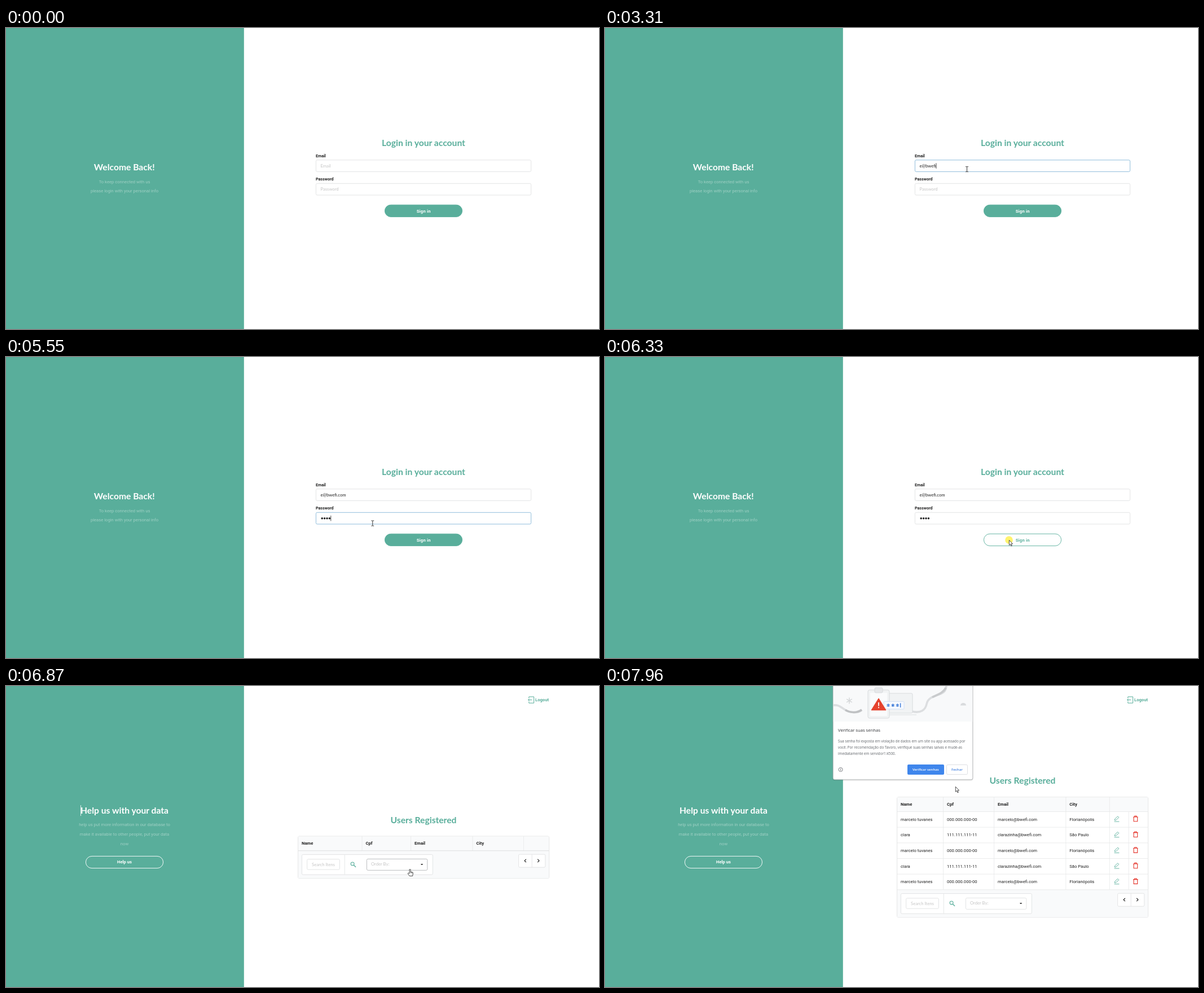
An HTML page that plays this animation: 1051 by 533 pixels, repeating every 8000 ms.

```html
<!DOCTYPE html>
<html lang="en">
<head>
<meta charset="utf-8">
<title>Login demo</title>
<style>
  html, body { margin: 0; width: 100%; height: 100%; overflow: hidden; background: #fff; }
  svg { display: block; width: 100vw; height: 100vh; }
  text { font-family: Roboto, sans-serif; font-size: 7.66px; fill: #212121; white-space: pre; }
  .title { font-family: Lato, sans-serif; font-size: 15.65px; font-weight: 700; fill: #59ae9b; }
  .field { font-family: Lato, sans-serif; }
  .hint { font-family: Lato, sans-serif; fill: #c5c5c5; }
  .label { font-size: 7.12px; font-weight: 700; }
  .bold { font-weight: 700; }
  .note { fill: #9fd0c4; }
  .white { fill: #fff; }
  .green { fill: #59ae9b; }
  .mid { text-anchor: middle; }
  .dialog text { font-family: "Open Sans", sans-serif; font-size: 6.27px; fill: #5f6368; }
  .dialog .head { font-size: 7.66px; fill: #303236; }
  .dialog .action { font-size: 6.1px; font-weight: 600; text-anchor: middle; }
</style>
</head>
<body>
<svg id="stage" viewBox="0 0 1051 533" xmlns="http://www.w3.org/2000/svg"></svg>
<script>
const LOOP = 8000, STEP = 75.5, BLINK = 530;
const GREEN = '#59ae9b', LINE = '#e0e1e2', BLUE = '#85b7d9';
const ADDRESS = 'e@bwefi.com';
const EMAIL_KEYS = [1280, 2150, 2530, 2610, 3010, 3160, 3310, 3770, 3850, 4000, 4170];
const PASS_KEYS = [5170, 5320, 5400, 5470];
const EMAIL_FOCUS = 745, PASS_FOCUS = 5020, HOVER = 5620, PRESS = 6250;
const HOME = 6490, LOADED = 6940, DIALOG = 7250;
const ROW = 27.65;

const text = (x, y, s, cls = '', extra = '') =>
  `<text x="${x}" y="${y}" class="${cls}" ${extra}>${s}</text>`;
const rect = (x, y, w, h, fill, extra = '') =>
  `<rect x="${x}" y="${y}" width="${w}" height="${h}" fill="${fill}" ${extra}/>`;
const path = (d, stroke, width = 1, extra = '') =>
  `<path d="${d}" fill="none" stroke="${stroke}" stroke-width="${width}" ${extra}/>`;
const box = (x, y, w, h, r, stroke = LINE, fill = '#fff', extra = '') =>
  rect(x, y, w, h, fill, `rx="${r}" stroke="${stroke}" stroke-width=".9" ${extra}`);
const group = (id, body, extra = '') => `<g id="${id}" ${extra}>${body}</g>`;

function loginPage() {
  return text(209.7, 252.2, 'Welcome Back!', 'title white mid')
    + text(210, 274.7, 'To keep connected with us', 'note mid')
    + text(210, 291.2, 'please login with your personal info', 'note mid')
    + text(740, 209.2, 'Login in your account', 'title mid')
    + text(549, 228.7, 'Email', 'label')
    + text(549, 270.2, 'Password', 'label')
    + box(549.4, 233.8, 381.2, 20.6, 2.2, LINE, '#fff', 'id="emailBox"')
    + box(549.4, 275.3, 381.2, 20.6, 2.2, LINE, '#fff', 'id="passBox"')
    + text(557.5, 246.8, 'Email', 'hint', 'id="emailHint"')
    + text(557.5, 288.3, 'Password', 'hint', 'id="passHint"')
    + text(557.5, 246.8, '', 'field', 'id="emailText"')
    + group('dots', PASS_KEYS.map((_, i) =>
        `<circle cx="${560.2 + i * 4.4}" cy="285.7" r="1.75" fill="#222"/>`).join(''))
    + rect(0, 0, .8, 9.6, '#222', 'id="caret"')
    + box(671.4, 313.2, 137.2, 21.2, 10.6, GREEN, GREEN, 'id="signBox"')
    + text(740.2, 326.5, 'Sign in', 'bold mid', 'id="signText" letter-spacing=".2"');
}

function sidePanel() {
  const lines = ['help us put more information in our database to',
    'make it available to other people, put your data', 'now'];
  return text(210, 226.3, 'Help us with your data', 'title white mid')
    + lines.map((s, i) => text(210, 248.3 + i * 16.6, s, 'note mid')).join('')
    + box(141.4, 301.4, 137.2, 21.2, 10.6, '#fff', 'none')
    + text(210, 314.3, 'Help us', 'bold white mid')
    + rect(132.2, 211, .8, 19, '#fff', 'id="sideCaret"');
}

function logout() {
  return path('M926.8 21.8V19H935.6V30.2H926.8V27.4M925.4 24.6H932.2M927.6 22.6L925.5 24.6L927.6 26.6', GREEN, 1)
    + text(938, 27, 'Logout', 'bold green');
}

const pencil = (x, y) =>
  path(`M${x - 4.2} ${y + 4.6}H${x + 4.6}M${x - 3.6} ${y + 2.4}L${x - 3} ${y - .2}L${x + 2} ${y - 4.8}L${x + 4} ${y - 2.8}L${x - 1} ${y + 1.8}Z`, GREEN, .9);
const bin = (x, y) =>
  path(`M${x - 4.3} ${y - 3.2}H${x + 4.3}M${x - 1.8} ${y - 3.2}V${y - 4.8}H${x + 1.8}V${y - 3.2}M${x - 3.3} ${y - 3}V${y + 4.6}H${x + 3.3}V${y - 3}`, '#e5352b', 1.1);

function footer(y, order) {
  return box(524.4, y + 6.8, 232, 35.6, 2)
    + path(`M600.3 ${y + 7}V${y + 42}`, LINE, .8)
    + box(533.6, y + 15, 57.8, 18.4, 2)
    + text(542, y + 27.1, 'Search Itens', 'hint')
    + `<circle cx="614.1" cy="${y + 23.2}" r="2.9" fill="none" stroke="${GREEN}" stroke-width="1.1"/>`
    + path(`M616.2 ${y + 25.3}L620 ${y + 29}`, GREEN, 1.3)
    + box(639.4, y + 14.6, 107.4, 20, 2.2, order)
    + text(647, y + 26.7, 'Order By:', 'hint')
    + `<path d="M734.9 ${y + 23.3}h4.4l-2.2 2.3z" fill="#222"/>`
    + box(908.6, y + 6.4, 47.2, 23, 2)
    + path(`M932.2 ${y + 6.4}v23`, LINE, .8)
    + path(`M921.8 ${y + 15}l-2.7 2.7l2.7 2.7M942.2 ${y + 15}l2.7 2.7l-2.7 2.7`, '#222', 1.2);
}

function table(top, cols, rows, order) {
  const head = top + 25.7, foot = head + rows.length * ROW, bottom = foot + 49;
  const left = [517.6, ...cols];
  let s = text(740, top - 23.5, 'Users Registered', 'title mid')
    + box(517.6, top, 445, bottom - top, 2.2)
    + rect(518, top + .4, 444.2, 25.3, '#f9fafb')
    + rect(518, foot, 444.2, 48.6, '#f9fafb')
    + ['Name', 'Cpf', 'Email', 'City'].map((h, i) => text(left[i] + 6.5, top + 15.3, h, 'bold')).join('');
  cols.forEach((x, i) => {
    const end = rows.length ? foot : head;
    s += path(`M${x} ${i > 3 ? head : top}V${end}`, '#e8e9ea', .8);
  });
  for (let i = 0; i <= rows.length; i++)
    s += path(`M518 ${head + i * ROW}H962.4`, rows.length ? '#e6e7e8' : '#d6d7d8', .8);
  rows.forEach((cells, r) => {
    const y = head + r * ROW + 13.5;
    s += cells.map((c, i) => text(left[i] + 6.5, y + 2.8, c)).join('') + pencil(906.8, y - .5) + bin(940.4, y - .8);
  });
  return s + footer(foot, order);
}

function star(x, y, r, color, width) {
  let d = '';
  for (let i = 0; i < 3; i++) {
    const a = Math.PI / 2 + i * Math.PI / 3, dx = r * Math.cos(a), dy = r * Math.sin(a);
    d += `M${x - dx} ${y - dy}L${x + dx} ${y + dy}`;
  }
  return path(d, color, width);
}

function dialog() {
  const lines = ['Sua senha foi exposta em violação de dados em um site ou app acessado por',
    'você. Por recomendação do Tavoro, verifique suas senhas salvas e mude-as',
    'imediatamente em servidor1:4500.'];
  return rect(403.4, -6, 249.2, 173.4, '#000', 'rx="4" opacity=".12"')
    + box(404.2, -8, 247.6, 173.8, 3, '#b4b7b8')
    + rect(404.7, 0, 246.6, 63, '#f8f9fa')
    + path('M404.7 34C416 33 419 39 427 43S446 49 455 43', '#dcdee0', 3.6)
    + path('M426 42.5C436 48 447 48 455 42', '#bfc1c3', 3.6)
    + path('M544 45C560 49 568 42 570 32S580 19 592 15S604 6 605 0', '#dcdee0', 3.6)
    + path('M580 20C590 15 600 12 604 3', '#c9cbcd', 3.6)
    + star(433, 26, 5.6, '#d5d7d9', 1.5)
    + '<path d="M630 34.5a5 4.6 0 0 1 10 0z" fill="#d9dbdd"/>'
    + box(499, 13, 46, 35, 2, '#d5d8db', '#f1f3f4')
    + path('M490 51H552', '#dcdfe2', 1.2)
    + box(466, 7, 38, 50, 3, '#d5d8db', '#f1f3f4')
    + rect(470, 12, 30, 41, '#fafbfc')
    + box(478, 3, 14, 9, 2, '#d5d8db', '#e6e8ea')
    + box(494, 27.4, 36, 13.6, 1.5, '#cfdff5', '#f6f9fe')
    + [502, 510.3, 518.4].map(x => star(x, 34.2, 2.9, '#2f72d6', 1.2)).join('')
    + rect(523, 30.4, 1.3, 7.6, '#2f72d6')
    + '<path d="M485 22.4L497.6 42.6H472.4Z" fill="#e5432f" stroke="#e5432f" stroke-width="1.4" stroke-linejoin="round"/>'
    + rect(484.1, 29, 1.8, 6.4, '#fff') + rect(484.1, 37.2, 1.8, 1.9, '#fff')
    + text(413, 81.2, 'Verificar suas senhas', 'head')
    + lines.map((s, i) => text(413, 100.4 + i * 11, s)).join('')
    + '<circle cx="417.6" cy="148" r="3.5" fill="none" stroke="#5f6368" stroke-width=".8"/>'
    + rect(417.2, 147.3, .9, 2.6, '#5f6368') + rect(417.2, 145.8, .9, .9, '#5f6368')
    + rect(536, 139, 65, 18, '#3f86ec', 'rx="2"')
    + text(568.4, 150.2, 'Verificar senhas', 'action', 'style="fill:#fff"')
    + box(605.5, 139.4, 37, 17.2, 2, '#dadce0')
    + text(624, 150.2, 'Fechar', 'action', 'style="fill:#3f7fe0"');
}

function pointers() {
  return group('glow', '<circle r="6.8" fill="#fff04a" opacity=".8"/>')
    + group('arrow', '<path d="M.3 .3V9.3L2.4 7.4L3.9 10.9L5.3 10.3L3.8 6.9H6.6Z" fill="#fff" stroke="#222" stroke-width=".8"/>')
    + group('beam', path('M-2.4 -4.6H-.6L0 -4.1L.6 -4.6H2.4M0 -4.2V4.2M-2.4 4.6H-.6L0 4.1L.6 4.6H2.4', '#222', .9))
    + group('hand', '<path d="M-1 1Q0 -.3 1 1V5L4.4 5.8Q5.6 6.2 5.4 7.6L4.6 12.4H-.8L-3.8 8.2Q-3.8 6.8 -2.4 7.2L-1 8.2Z" fill="#fff" stroke="#222" stroke-width=".8" stroke-linejoin="round"/>'
      + path('M1 5V7.4M2.8 5.5V7.6M4.2 6V7.8', '#222', .6));
}

const person = ['marcelo tuvanes', '000.000.000-00', 'marcelo@bwefi.com', 'Florianópolis'];
const other = ['clara', '111.111.111-11', 'clarazinha@bwefi.com', 'São Paulo'];

const stage = document.getElementById('stage');
stage.innerHTML = rect(0, 0, 1051, 533, '#fff') + rect(0, 0, 421.8, 533, GREEN)
  + group('login', loginPage())
  + group('home', sidePanel() + logout()
    + group('empty', table(266, [631, 717.5, 827, 917.5], [], '#b4b6b8'))
    + group('full', table(196.8, [599.5, 689.5, 816.8, 894.3, 928.2], [person, other, person, other, person], LINE)))
  + group('dialog', dialog(), 'class="dialog"')
  + pointers();

const ui = {};
stage.querySelectorAll('[id]').forEach(n => ui[n.id] = n);
const show = (id, on) => ui[id].setAttribute('display', on ? 'inline' : 'none');
const set = (id, attrs) => { for (const k in attrs) ui[id].setAttribute(k, attrs[k]); };

const MOVES = [
  [70, 670, [1026, 521], [641.5, 250]],
  [4640, 4940, [641.5, 250], [631.5, 281.3]],
  [5550, 5700, [631.5, 281.3], [702, 332]],
  [5860, 6100, [702, 332], [716, 324]],
  [7710, 7955, [716, 324], [621, 178]]
];

function pointerAt(t) {
  let at = null;
  for (const [t0, t1, a, b] of MOVES) {
    if (t < t0) break;
    const steps = Math.round((t1 - t0) / STEP) + 1;
    const u = Math.min(1, (Math.floor((t - t0) / STEP) + 1) / steps);
    const e = u * u * (3 - 2 * u);
    at = [a[0] + (b[0] - a[0]) * e, a[1] + (b[1] - a[1]) * e];
  }
  return at;
}

function pointerKind(t, [x, y]) {
  if (t >= HOME) return t < LOADED ? 'hand' : 'arrow';
  if (t >= PRESS) return 'arrow';
  if (t >= HOVER) return 'hand';
  const inField = x > 549 && x < 931 && ((y > 233 && y < 255) || (y > 275 && y < 296));
  return inField ? 'beam' : 'arrow';
}

const count = (keys, t) => keys.filter(k => k <= t).length;

function draw(t) {
  const typed = count(EMAIL_KEYS, t), dots = count(PASS_KEYS, t);
  const inEmail = t >= EMAIL_FOCUS && t < PASS_FOCUS;
  const inPass = t >= PASS_FOCUS && t < PRESS;

  show('login', t < HOME);
  show('home', t >= HOME);
  show('empty', t < LOADED);
  show('full', t >= LOADED);
  show('sideCaret', t >= 6720 && t < LOADED);
  show('dialog', t >= DIALOG);

  ui.emailText.textContent = ADDRESS.slice(0, typed);
  show('emailHint', !typed);
  show('passHint', !dots);
  [...ui.dots.children].forEach((d, i) => d.setAttribute('display', i < dots ? 'inline' : 'none'));
  set('emailBox', { stroke: inEmail ? BLUE : LINE });
  set('passBox', { stroke: inPass ? BLUE : LINE });

  const last = inEmail ? Math.max(EMAIL_FOCUS, EMAIL_KEYS[typed - 1] || 0)
                       : Math.max(PASS_FOCUS, PASS_KEYS[dots - 1] || 0);
  show('caret', (inEmail || inPass) && Math.floor((t - last) / BLINK) % 2 === 0);
  if (inEmail) set('caret', { x: 557.5 + (typed ? ui.emailText.getComputedTextLength() : 0), y: 239.3 });
  else set('caret', { x: 557.8 + dots * 4.4, y: 280.8 });

  const hover = t >= HOVER;
  set('signBox', { fill: hover ? '#fff' : GREEN });
  ui.signText.style.fill = hover ? GREEN : '#fff';

  const at = pointerAt(t), kind = at && pointerKind(t, at);
  for (const id of ['arrow', 'beam', 'hand']) show(id, id === kind);
  const pressed = [[745, 820], [5020, 5100], [PRESS, 6410]].some(([a, b]) => t >= a && t < b);
  show('glow', at && pressed);
  if (at) for (const id of ['arrow', 'beam', 'hand', 'glow']) set(id, { transform: `translate(${at})` });
}

const began = performance.now();
function tick() {
  draw((performance.now() - began) % LOOP);
  requestAnimationFrame(tick);
}
tick();
</script>
</body>
</html>
```
